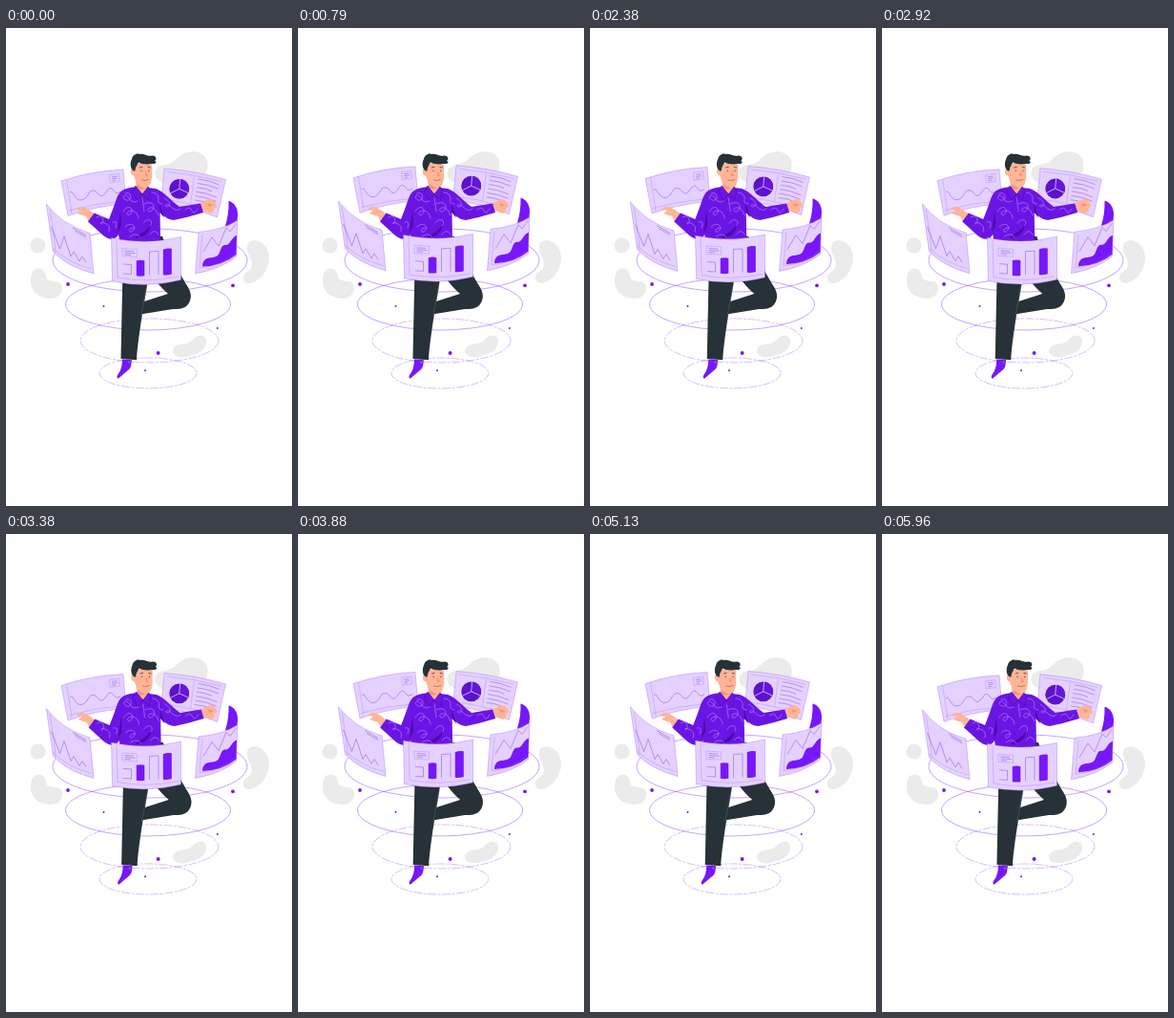
Recreate the animation shown at these times as an HTML page. Size 300 by 500 pixels, loop 6 s.

```html
<!DOCTYPE html>
<html lang="en">
<head>
<meta charset="utf-8">
<title>Floating dashboards</title>
<style>
html, body { margin: 0; width: 100%; height: 100%; overflow: hidden; background: #fff; }
svg { display: block; width: 100%; height: 100%; }
.blob { fill: #ebebeb; }
.ring { fill: none; stroke: #7a22ff; stroke-width: .42; }
.dashed { stroke-width: .3; stroke-dasharray: 9 1.5 3 1.5; }
.dot, .accent { fill: #7717fa; }
.panel { fill: #e4d1ff; stroke: #9a5cf5; stroke-width: .35; }
.thin { fill: none; stroke: #7d3ae0; stroke-width: .45; stroke-linejoin: round; }
.faint { fill: none; stroke: #a674f2; stroke-width: .35; }
.shirt { fill: #6b15e4; }
.shade { fill: #4b0da8; }
.swirl { fill: none; stroke: #c9a2ff; stroke-width: .5; stroke-linecap: round; }
.dark { fill: #263238; }
.skin { fill: #ffb496; }
.warm { fill: #f09478; }
.ink { fill: none; stroke: #263238; stroke-width: .7; stroke-linecap: round; }
</style>
</head>
<body>
<svg viewBox="0 0 300 500">
  <g class="blob">
    <circle cx="33.5" cy="227.5" r="8"/>
    <path d="M31 252C39 250 42 256 42 261C44 266 52 263 57 267C62 273 57 283 47 283C36 283 25 276 26 264Q26 254 31 252Z"/>
    <path d="M160 145C166 142 174 143 180 136C188 128 203 126 210 136C216 150 205 161 193 160C181 160 170 165 161 160C155 156 155 148 160 145Z"/>
    <path d="M255 224C264 219 274 226 276 238C277 252 267 265 256 267C247 268 247 258 253 255C260 251 258 244 255 238C252 232 252 227 255 224Z"/>
    <path d="M179 332C185 329 191 332 196 326C201 320 209 320 210 327C210 336 203 341 195 342C188 346 177 345 175 339Q175 334 179 332Z"/>
  </g>
  <ellipse class="ring" cx="151" cy="243" rx="102" ry="33"/>
  <ellipse class="ring" cx="149" cy="289" rx="86.5" ry="27"/>
  <ellipse class="ring dashed" cx="150.5" cy="327" rx="72.5" ry="23"/>
  <ellipse class="ring dashed" cx="149" cy="361" rx="51" ry="16"/>
  <g class="dot">
    <circle cx="65" cy="268" r="1.9"/><circle cx="238" cy="269.3" r="1.9"/>
    <circle cx="102.5" cy="291" r="1"/><circle cx="221.8" cy="314" r="1"/>
    <circle cx="159.6" cy="340" r="2"/><circle cx="146" cy="358.3" r="1"/>
  </g>

  <g class="float">
    <path class="panel" d="M58 160Q89 149.500 123 148L126 184Q95 186 65 196.500Z"/>
    <path class="faint" d="M63.500 158.500L69 194M66 191Q94 183 124 181"/>
    <path class="thin" d="M67 172C70 168 72 181 79 180C86 179 86 170 91 170C97 170 97 178 102 175C106 172 107 166 111 168C114 171 115 175 120 171"/>
    <path class="faint" d="M108.500 154L118.500 152.500L119.300 160.500L109.300 162Z"/>
    <path class="thin" d="M111 156L116.500 155.200M111.300 158L116.800 157.200M111.500 160L115 159.500"/>

    <path class="panel" d="M166 147Q200 149.500 230.500 158.500L221.500 198Q192 186.500 162.500 183.500Z"/>
    <path class="faint" d="M169 150.500Q198 153 226 160.500M197.500 155L193.500 184M166 179.500Q190 182 217 191"/>
    <circle cx="181.700" cy="168.300" r="10.400" fill="#5d12cb"/>
    <path d="M181.700 168.300L182.700 157.900A10.400 10.400 0 0 1 191.200 172.500Z" fill="#6714dc"/>
    <path d="M182.700 157.500L181.700 168.300L191.700 172.800M181.700 168.300L172.200 173" fill="none" stroke="#e4d1ff" stroke-width=".8"/>
    <g id="text-lines" class="thin"></g>
  </g>

  <g id="man">
    <path class="dark" d="M122.500 215L164 218C174 244 184 259 189 268C194 275 196 282 191 289C187 294 181 294 175 294L141 299.500L143.500 286.500L170 278C163 272 158 266 154 260L149 262C146 284 139 318 137 347.200L120.500 346Q121.500 297 122.500 250Z"/>
    <path d="M148 268Q145 284 141.800 301" fill="none" stroke="#61696e" stroke-width=".5"/>
    <path class="accent" d="M122 346.500L132 347.200C131 352 132 355 128 358L118 366.500C116 367 116 364 118 361.500Q122 356 122 346.500Z"/>
    <path d="M128.500 349.500L130 350" stroke="#e4d1ff" stroke-width=".8"/>

    <path class="skin" d="M92 194C88 191 83 187 79 187C75 187 73 189 74 190L79 191L75 194Q80 196 84 197L87 203Z"/>
    <path class="skin" d="M204 183L211 180C216 178 219 181 221 186C221 189 218 187 218 188C219 191 217 193 215 194L206 191Z"/>
    <path class="warm" d="M211 183L217 185L213 187Z"/>
    <path class="shirt" d="M137 166C127 167 120 168.500 116.500 177Q112 190 108 200L92.500 193.500L86 202.500L102 217C108 222 115 222 118 216L119 222Q145 226 162 221L161.500 193Q168 200 176 201Q191 198 207 193L204 183.500L182 187C174 182 166 171 157 168L149 167Z"/>
    <path class="shade" d="M120 190L121 206L117 215ZM161 183L161.500 193L166 198.500ZM152 203C149 213 142 213 135 220L141 219Q152 215 152 203Z"/>
    <g class="swirl">
      <path d="M125 173C132 170 133 182 126 180C120 178 125 171 129 178Q132 184 138 181"/>
      <path d="M123 192C127 184 135 188 131 194C127 199 124 191 132 191Q138 192 139 199"/>
      <path d="M145 184C153 180 158 186 153 191C149 195 145 187 154 188Q158 190 160 196"/>
      <path d="M125 208C130 202 138 207 133 212C130 216 126 209 135 209M144 204C149 197 156 202 151 207"/>
      <path d="M153 172Q159 172 160 178Q158 184 164 184M166 178C171 180 174 186 169 187C165 187 168 182 173 187Q179 193 183 189"/>
      <path d="M95 198Q101 194 102 202C101 208 96 202 103 204Q110 206 108 213M112 203Q118 201 115 209M188 190Q193 186 195 191T201 189"/>
      <path d="M130 218Q137 213 141 219M151 216Q156 209 160 216M143 178L145 192"/>
    </g>

    <path class="skin" d="M136 160L137 169Q143 177 150 169L148 160Z"/>
    <path class="warm" d="M137.500 163L147 166Q143 171 138 167Z"/>
    <path class="skin" d="M133 146C129.500 147 130 154 134 154.500L136 160C139 165 143 167.500 147 167C151 166 152.500 162 153 156L153 143L143 140L135 144Z"/>
    <path class="dark" d="M134 149.500C130 147 130 141 132 137C133 133 137 130.500 140 132C144 130.500 149 135 153 133.500C157 133 159 137 156 139C159 140 157 142.500 154 142C148 143 142 142.500 139 140.500C137 144 135.500 146 135.500 149.500Z"/>
    <path class="ink" d="M140.300 146L143 145.400M149 145.500L151.500 146M142 149v.8M149.800 149v.8"/>
    <path class="warm" d="M146.500 149L148.800 155L146 155.300Z"/>
    <path class="ink" d="M142.500 159Q146 160.500 149.500 158.600" style="stroke-width:.4"/>
    <path class="shirt" d="M136 165L132.500 171L137 180L143 174ZM149 166L151.500 170L149.500 180L143 174Z" stroke="#4b0da8" stroke-width=".6"/>
  </g>

  <g class="float">
    <path class="panel" d="M42.200 184Q59 206 88 214.500L92 257Q64 249.500 49.500 234Z"/>
    <path class="faint" d="M46 189Q52 228 52 235M48.500 230Q66 246 90 252"/>
    <path class="thin" d="M47.500 208L56.500 231L61 218L68 239L71 234L77 244L80 239L84 245.500"/>
    <path class="thin" d="M70 209L84 217M72 212L84 219"/>

    <path class="accent" d="M233.500 181C239 182 243.500 188 243 196L242 207H230Q234 194 233.500 181Z"/>
    <path class="panel" d="M202 213.500Q228 211 243 201L241.500 239Q226 252 198.500 257Z"/>
    <path class="accent" d="M206 249.500C206 243 210 241 213 240.500C217 240 219 240 222 238C225 235 225 227 230 227C235 228 236 219 242 217L241.500 237Q227 249 206 249.500Z"/>
    <path class="thin" d="M207 234L216 219L223 228L231 209L235 213L241 205"/>
    <path class="faint" d="M206 216L203 251Q226 249 240 236"/>

    <path class="panel" d="M110.500 219.500Q147 227.500 183.500 218.500L183.500 263.500Q147 272.500 111.500 265Z"/>
    <path class="faint" d="M116 222L117 261Q148 267 181 260M122 230.500L137.500 231.500V239.500L122 238.800Z"/>
    <path class="thin" d="M124.500 233L134 233.600M124.500 235L135.500 235.700M124.500 237L131 237.400M123 247L131.500 247.500V257.500L123 257M150.500 258.500V234L160 233.500V258"/>
    <path class="accent" d="M136.800 243.300Q141 242.200 145.300 243.300V259.300Q141 260 136.800 259.300ZM164.800 231.800Q169 230 173.800 230.800V257.500Q169 259 164.800 258.300Z"/>
  </g>
</svg>
<script>
const floats = document.querySelectorAll('.float');
const man = document.getElementById('man');
const sway = [0, -1, 2, -4, 4, -4, 4, -4, 2, -1, 0];

// Paragraph beside the pie chart
document.getElementById('text-lines').innerHTML = Array.from({ length: 6 }, (_, i) => {
  const x = 201.5 - i * .75, y = 158 + i * 4.4;
  return `<path d="M${x} ${y}q11 1 ${i % 3 == 2 ? '16 4' : '22 6'}"/>`;
}).join('');

function draw() {
  const t = performance.now() % 6000;
  const lift = 6 * (1 - Math.abs(1 - (t % 3000) / 1500));
  floats.forEach(g => g.setAttribute('transform', `translate(0 ${-lift})`));

  const i = Math.floor(t / 600), k = t / 600 - i;
  const x = .6 * (sway[i] + (sway[i + 1] - sway[i]) * k);
  man.setAttribute('transform', `translate(${x} 0)`);
  requestAnimationFrame(draw);
}
draw();
</script>
</body>
</html>
```
